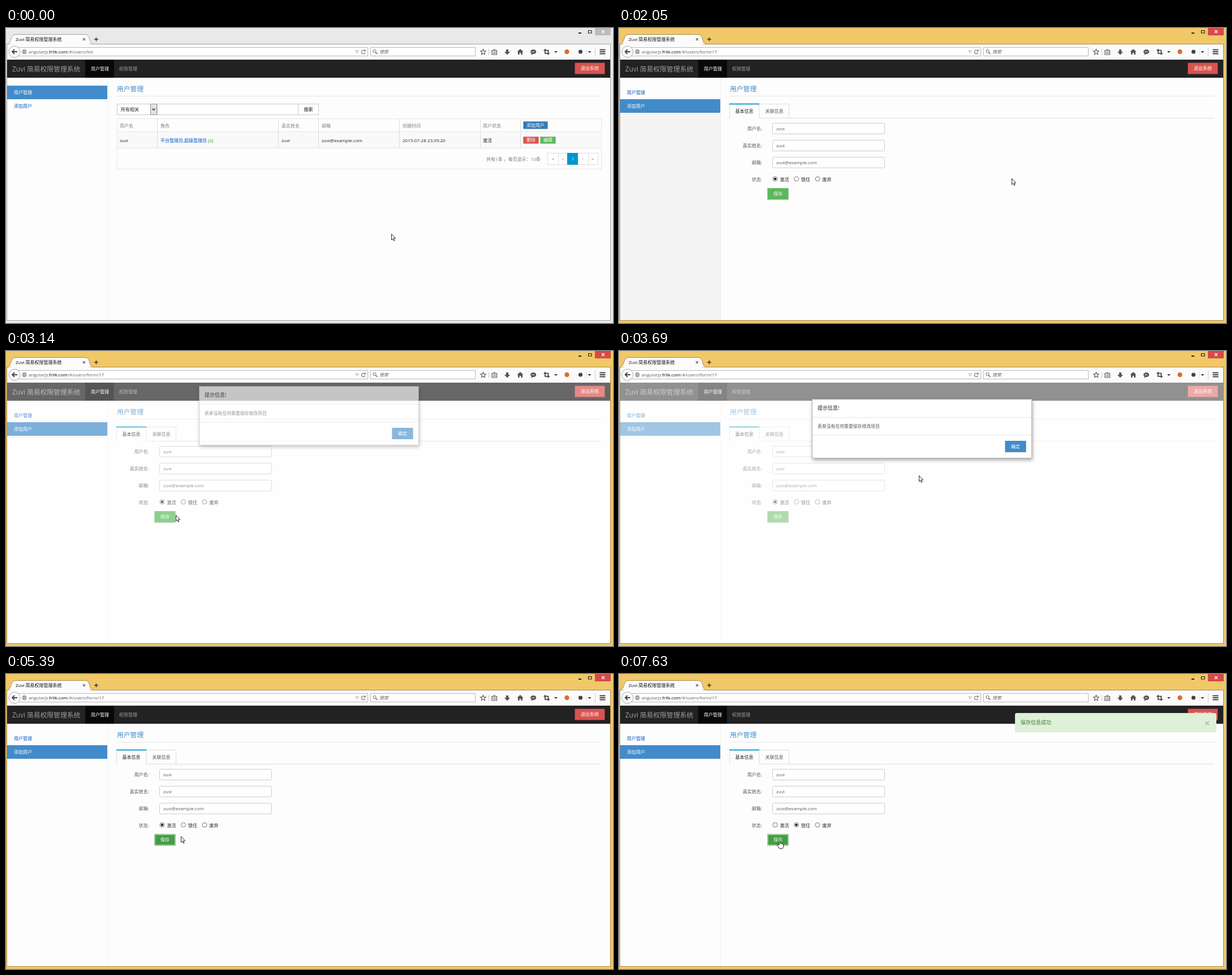
An HTML page that plays this animation: 1073 px wide and 522 px high, repeating every 8000 ms.

```html
<!DOCTYPE html>
<html>
<head>
<meta charset="utf-8">
<style>
html, body { margin: 0; width: 100%; height: 100%; overflow: hidden; background: #e9e9e9; }
svg { display: block; width: 100vw; height: 100vh; font-family: "Open Sans", "Noto Sans CJK SC", "Noto Sans CJK", sans-serif;
  --frame: #e9e9e9; --edge: #a2a2a2; --close: #bcbcbc; }
svg.active { --frame: #f0c868; --edge: #a98c4c; --close: #d64a48; }
text { white-space: pre; }
#modal { filter: drop-shadow(1px 3px 3px rgba(0,0,0,.35)); }
</style>
</head>
<body>
<svg id="stage" viewBox="0 0 1073 522"></svg>
<script>
const stage = document.getElementById('stage');
const $ = id => document.getElementById(id);
const USER = 'zuvi', MAIL = 'zuvi@example.com', SITE = 'Zuvi 简易权限管理系统';
const BLUE = '#428bca', RED = '#d9534f', GREEN = '#5cb85c', DARK_GREEN = '#449d44';
const LINK = '#0057c8', LINE = '#ddd', PALE = '#e6e6e6', ICON = '#555';

// Drawing helpers: each returns SVG markup; text is placed by its vertical centre.
const text = (x, y, s, fill = '#222', size = 8, more = '') =>
  `<text x="${x}" y="${y + size * .37}" font-size="${size}" fill="${fill}" ${more}>${s}</text>`;
const mid = (x, y, s, fill, size, more = '') => text(x, y, s, fill, size, 'text-anchor="middle" ' + more);
const rect = (x, y, w, h, fill, more = '') => `<rect x="${x}" y="${y}" width="${w}" height="${h}" fill="${fill}" ${more}/>`;
const box = (x, y, w, h, fill, stroke, more = '') => rect(x + .5, y + .5, w - 1, h - 1, fill, `stroke="${stroke}" ${more}`);
const path = (d, stroke = ICON, width = 1, fill = 'none') => `<path d="${d}" stroke="${stroke}" stroke-width="${width}" fill="${fill}"/>`;
const solid = (d, fill = ICON) => path(d, 'none', 0, fill);
const dot = (x, y, r, fill, stroke = 'none') => `<circle cx="${x}" cy="${y}" r="${r}" fill="${fill}" stroke="${stroke}"/>`;
const button = (x, y, w, h, fill, s, size) =>
  box(x, y, w, h, fill, 'rgba(0,0,0,.08)') + mid(x + w / 2, y + h / 2, s, '#fff', size);
const group = (id, s) => `<g id="${id}">${s}</g>`;
const caret = x => solid(`M${x - 3} 41h6l-3 3z`, '#333');

function browser() {
  return rect(0, 0, 1073, 522, 'var(--frame)') +
    rect(1041, 0, 28, 13, 'var(--close)') +
    path('M1053 4l5 5m0-5l-5 5', '#fff', 1.2) +
    path('M1012 9h5', '#222', 2) + path('M1029.5 4.5h5.5v4.5h-5.5z', '#222', 1.2) +
    rect(1.5, 28.5, 1067, 489, '#fdfdfd', 'stroke="var(--edge)"') +
    path('M2 28.5C10 28 7 11.5 17 11.5H140C150 11.5 146 28 154 28.5', 'var(--edge)', 1, '#fbfbfb') +
    rect(2, 29, 1066, 27, '#fbfbfb') + rect(9, 28, 138, 1, '#fbfbfb') +
    text(17, 20, SITE, '#111') +
    path('M136 18l4 4m0-4l-4 4', '#666', 1.2) + path('M156 20h7m-3.5-3.5v7', '#333', 1.4) +
    box(20, 34, 620, 16, '#fff', '#b8b8b8') + dot(15, 42, 10, '#fdfdfd', '#aaa') +
    path('M20 42h-9m4-4l-4 4l4 4', '#444', 1.8) +
    dot(32.5, 42, 4.3, '#888') + path('M28.5 42h8M32.5 38v8M30 39q-1.5 3 0 6M35 39q1.5 3 0 6', '#eee', .7) +
    `<text x="40" y="45" font-size="8" fill="#5c5c5c">angularjs.<tspan fill="#000">frllk.com</tspan><tspan id="route"></tspan></text>` +
    path('M618 40h5l-2.5 4.5z', '#999', .8) + path('M634.5 40.5a3.3 3.3 0 1 0 .3 3M635 38v3h-3', '#777', 1.2) +
    box(644, 34, 186, 16, '#fff', '#b8b8b8') +
    dot(651.5, 41, 2.6, 'none', '#666') + path('M653.5 43l3 3', '#666', 1.4) +
    text(660, 42, '搜索', '#666', 8, 'font-style="italic"') + tools();
}

function tools() {
  const star = Array.from({ length: 10 }, (_, i) => {
    const r = i % 2 ? 2.3 : 5, a = i * Math.PI / 5;
    return `${843.5 + r * Math.sin(a)} ${42.5 - r * Math.cos(a)}`;
  }).join('L');
  return path(`M${star}Z`, ICON, 1.1) +
    path('M853.5 37v11M1041.5 34v17', '#ccc') +
    path('M859 39.5h8.5v7.5h-8.5zM861.5 38h3.5', ICON, 1.2) + path('M861 42h5m-5 2.5h5') +
    solid('M884 38h4v4h3l-5 5.500l-5-5.500h3z') +
    solid('M909 37l5.5 5h-1.5v5h-2.7v-3h-2.6v3h-2.7v-5h-1.5z') +
    solid('M932 38c7 0 7 8 0 8l-4 1.5l1-2.5c-4-3-1-7 3-7z') + path('M929.5 42h5', '#fff') +
    path('M953 37v8h8M950.5 39.5h8v8', '#333', 1.6) + caret(972) +
    dot(991.5, 42, 4.2, '#df6a33') + dot(1015.5, 42, 3.6, '#444') +
    path('M1025.5 37v11', '#ddd') + caret(1031.5) +
    path('M1049.5 38.5h10m-10 3.5h10m-10 3.5h10', '#444', 1.8);
}

function shell() {
  return rect(2, 56, 1066, 32, '#222') + rect(140, 56, 51, 32, '#080808') +
    text(11, 72.5, SITE, '#9d9d9d', 11.8) +
    text(150, 72, '用户管理', '#fff') + text(200, 72, '权限管理', '#9d9d9d') +
    button(1005, 61, 54, 21, RED, '退出系统') +
    `<rect id="side" x="2" y="150" width="177" height="367" fill="#f4f4f4"/>` +
    path('M179.5 88V517', '#eee') +
    `<rect id="chosen" x="2" width="177" height="24" fill="${BLUE}"/>` +
    text(14, 114, '用户管理', '', 8, 'id="menu0"') + text(14, 138, '添加用户', '', 8, 'id="menu1"') +
    text(196, 108, '用户管理', BLUE, 11.8) + path('M196 120.5H1052', '#e8e8e8');
}

function list() {
  const heads = { 201: '用户名', 273: '角色', 487: '真实姓名', 558: '邮箱', 701: '创建时间', 843: '用户状态' };
  const cells = { 201: USER, 487: USER, 558: MAIL, 701: '2015-07-28 23:39:20', 843: '激活' };
  const row = (o, y, fill) => Object.entries(o).map(([x, s]) => text(+x, y, s, fill)).join('');
  return box(196, 134, 72, 20, '#fff', '#ccc') + text(203, 144, '所有相关') +
    box(255, 134, 12, 20, '#e3e3e3', '#999') + path('M258.5 142.5l2.5 3l2.5-3', '#333', 1.3) +
    box(267, 134, 250, 20, '#fff', '#ccc') + box(516, 134, 37, 20, '#fff', '#ccc') + mid(534.5, 144, '搜索', '#111') +
    box(196, 160, 857, 90, '#fdfdfd', PALE) +
    `<rect id="row" x="197" y="184" width="855" height="29"/>` +
    path('M196 183.5H1052M196 212.5H1052', PALE) +
    path([267, 481, 552, 695, 838, 909].map(x => `M${x}.5 160V213`).join(''), LINE) +
    row(heads, 173, '#808080') + row(cells, 199, '#222') +
    text(273, 199, '平台管理员,超级管理员 <tspan fill="#1f931f">(2)</tspan>', LINK) +
    button(914, 165, 44, 14, '#337ab7', '添加用户') + button(914, 192, 28, 13, RED, '删除') +
    group('edit', button(944, 192, 28, 13, GREEN, '编辑')) +
    text(945, 232, '共有1条 ，每页显示：10条', '#777', 8, 'text-anchor="end"') +
    box(957, 221, 90, 21, '#fff', LINE) + path('M976.5 221v21M1029.5 221v21', LINE) +
    rect(992, 221, 19, 21, '#0095cc') +
    ['«', '‹', '1', '›', '»'].map((s, i) => mid(967 + i * 17.5, 231.5, s, i == 2 ? '#fff' : '#777')).join('');
}

function form() {
  const field = (y, label, value) => text(253, y, label + ':', '#555', 8, 'text-anchor="end"') +
    (value ? box(271, y - 10, 199, 20, '#fff', '#ccc', 'rx="2"') + text(278, y, value, '#555') : '');
  const radio = (x, s) => dot(x, 267, 4, '#fff', '#777') + text(x + 8.5, 268, s);
  return path('M195 159.5H1052', LINE) +
    path('M195.5 160V134h52.5v26', LINE, 1, '#fdfdfd') + rect(195, 133.5, 53, 2, '#1aa3cf') +
    path('M248 134.5h52.5V159', LINE) +
    mid(221.5, 147, '基本信息', '#222') + mid(274.5, 147, '关联信息', '#555') +
    field(178, '用户名', USER) + field(208, '真实姓名', USER) + field(238, '邮箱', MAIL) + field(268, '状态') +
    radio(276, '激活') + radio(313.5, '锁住') + radio(351, '废弃') +
    `<circle id="ring" cx="313.5" cy="267" r="4.3" fill="none" stroke="#3a7fc0" stroke-width="1.2"/>` +
    `<circle id="mark" cy="267" r="2.3" fill="#222"/>` +
    group('save', button(262, 283, 38, 21, GREEN, '保存')) +
    `<rect id="focus" x="263.5" y="284.5" width="35" height="18" fill="none" stroke="#a5d3a5"/>`;
}

function modal() {
  return box(0, 0, 389, 105, '#fff', '#b5b5b5') + path('M1 32.5H388M1 63.5H388', '#e5e5e5') +
    text(10, 16, '提示信息!', '#222', 9) + text(10, 48.5, '表单没有任何需要保存修改项目', '#555', 7.85) +
    button(341, 73.5, 38, 21, BLUE, '确定');
}

const ARROW = 'M.5 .5V11L2.9 8.8L4.5 12.5L6 11.8L4.4 8.1H7.6Z';
const HAND = 'M-1 8V1.5Q0-.5 1 1.5V6Q2.3 5 3 6.5Q4.5 5.7 5 7.2Q6.7 6.7 6.7 8.5V11Q6.5 13 5 15H-.5Q-2 12-4.5 9Q-4 6.5-1 9Z';

stage.innerHTML = browser() + shell() + group('list', list()) + group('form', form()) +
  group('status', box(2, 503, 138, 14, '#ececec', '#c4c4c4') + text(4.5, 510.5, 'angularjs.frllk.com/#/users/form/17', '#5c5c5c')) +
  `<rect id="veil" x="2" y="56" width="1066" height="461" fill="#fff"/>` + group('modal', modal()) +
  group('alert', box(700, 69, 356, 34, '#dff0d8', '#d6e9c6', 'rx="2"') + text(710, 86, '保存信息成功', '#3c763d', 9) +
    path('M1036.5 84l6.5 6.5m0-6.5l-6.5 6.5', '#a9b8a4', 1.5)) +
  group('arrow', path(ARROW, '#111', .9, '#fff')) + group('hand', path(HAND, '#111', .9, '#fff'));

// Pointer stops: time, x, y of the tip, and 1 for the hand.
const stops = [
  [0, 681, 364], [550, 692, 361], [670, 862, 285], [830, 954, 203], [970, 960, 196, 1],
  [2050, 694, 266], [2180, 408, 313], [2330, 385, 300], [2450, 350, 280], [2570, 328, 273], [2690, 316, 293],
  [2840, 290, 292, 1], [3140, 300, 290], [3390, 316, 289], [3540, 405, 271], [3690, 530, 220], [3810, 660, 178],
  [3930, 699, 163, 1], [4320, 699, 163], [4440, 685, 167], [4580, 606, 182], [4720, 438, 197],
  [4870, 385, 222], [4990, 330, 252], [5110, 291, 271], [5260, 288, 295], [5390, 309, 287],
  [5540, 300, 288], [5660, 290, 289], [5780, 286, 289], [5940, 311, 278], [6080, 316, 270], [6200, 313, 266],
  [6330, 311, 268], [6600, 306, 278], [6730, 294, 290, 1], [6850, 284, 294, 1]
];
// Dialog stops: time, opacity, top.
const fades = [[0, 0, 59], [3140, .62, 62], [3270, 1, 80], [3390, 1, 85], [4080, .6, 80], [4200, .15, 68], [4320, 0, 59]];

const latest = (rows, t) => rows.filter(r => r[0] <= t).pop();
const show = (id, on) => $(id).style.display = on ? '' : 'none';
const set = (id, key, value) => $(id).setAttribute(key, value);
const paint = (id, fill) => $(id).firstChild.setAttribute('fill', fill);

function draw(now) {
  const t = now % 8000, within = (a, b) => t >= a && t < b;
  const editing = t >= 1630, locked = t >= 6480;

  stage.classList.toggle('active', t >= 1500);
  $('route').textContent = editing ? '/#/users/form/17' : '/#/users/list';
  show('list', !editing);
  show('form', editing);
  show('side', within(1630, 3140));
  set('chosen', 'y', editing ? 126 : 102);
  set('menu0', 'fill', editing ? LINK : '#fff');
  set('menu1', 'fill', editing ? '#fff' : LINK);
  set('row', 'fill', t >= 830 ? '#f7f7f7' : '#f9f9f9');
  paint('edit', t >= 970 ? DARK_GREEN : GREEN);
  show('status', within(1350, 1750));

  const focused = within(2990, 3140) || within(4320, 6480) || t >= 6990;
  const hovered = within(2840, 3140) || t >= 6730;
  paint('save', focused || hovered ? DARK_GREEN : GREEN);
  show('focus', focused);
  set('mark', 'cx', locked ? 313.5 : 276);
  show('ring', within(6480, 6990));

  const [, alpha, top] = latest(fades, t);
  set('veil', 'opacity', alpha / 2);
  set('modal', 'opacity', alpha);
  set('modal', 'transform', `translate(341 ${top})`);
  show('modal', alpha > 0);
  show('alert', t >= 7630);

  const [, x, y, hand] = latest(stops, t);
  show('arrow', !hand);
  show('hand', hand);
  set(hand ? 'hand' : 'arrow', 'transform', `translate(${x} ${y})`);
}

const start = performance.now();
function tick() {
  draw(performance.now() - start);
  requestAnimationFrame(tick);
}
tick();
</script>
</body>
</html>
```
